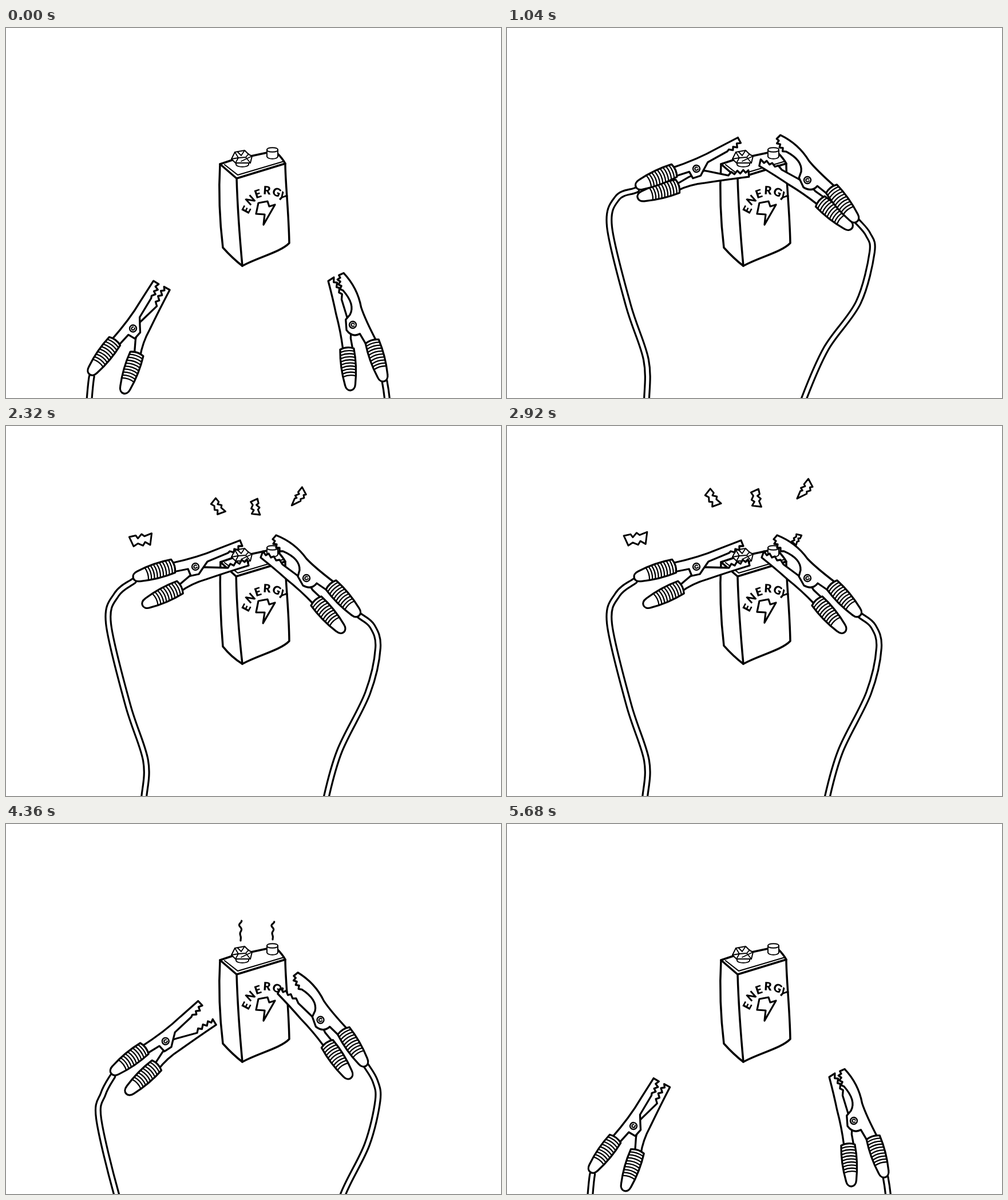
An HTML page with a canvas for the animation above (6.4 s loop, 865 by 647 pixels).

```html
<!DOCTYPE html>
<html lang="en">
<head>
<meta charset="utf-8">
<title>Battery and clamps</title>
<style>
html, body { margin: 0; width: 100%; height: 100%; overflow: hidden; background: #fff; }
canvas { display: block; width: 865px; height: 647px; }
</style>
</head>
<body>
<canvas id="stage" width="865" height="647"></canvas>
<script>
const ctx = document.getElementById('stage').getContext('2d');
const LOOP = 6400, STEP = 40, RAD = Math.PI / 180;

const clamp01 = v => Math.min(1, Math.max(0, v));
const lerp = (a, b, k) => a + (b - a) * k;
const mix = (p, q, k) => [lerp(p[0], q[0], k), lerp(p[1], q[1], k)];
const ease = (t, start, length) => (1 - Math.cos(Math.PI * clamp01((t - start) / length))) / 2;

function shape(path, width = 3.3, fill = '#fff') {
  if (typeof path === 'string') path = new Path2D(path);
  if (fill) { ctx.fillStyle = fill; ctx.fill(path); }
  ctx.lineWidth = width;
  ctx.stroke(path);
}
const polygon = points => 'M' + points.map(p => p.join(' ')).join('L') + 'Z';

// Lever outlines are drawn in the gripping pose, around the pivot.
const leftClamp = {
  pivot: [331, 246], rest: [221, 528], rise: [-45, 740], fall: [3760, 1240],
  main: {
    low: -36.6, open: -6.4, grip: [292, 245, 163.5],
    arm: 'M288 240Q335 230 370 215L409 200L413 210L406 210L406 217L399 215L398 221L391 219L388 222L352 237L343 250L337 259L323 262L318 250L288 256Z'
  },
  other: {
    low: -45.6, open: 10, grip: [304, 282, 154],
    arm: 'M300 280L320 263L345 247L351 247L388 248L392 241L398 244L402 237L408 241L412 234L417 238L421 233L424 244Q385 256 350 268Q325 275 304 290Z'
  },
  tail: [[242, 259], [223, 271]],
  held: [[193, 295], [179, 345], [213, 488], [244, 585], [241, 650], [236, 690]],
  wide: [[193, 297], [179, 347], [212, 485], [243, 580], [244, 650], [241, 690]],
  slack: [[144, 667], [143, 701], [171, 824], [200, 900], [200, 960], [200, 1000]]
};
const rightClamp = {
  pivot: [525, 266], rest: [606, 519], rise: [0, 760], fall: [3900, 1240],
  main: {
    low: 25.3, open: 4.3, grip: [568, 278, 47.7],
    arm: 'M577 276Q540 248 525 232Q505 204 472 191L466 198L470 201L467 206L473 207L472 213L478 213L478 219L484 219Q514 232 513 252L510 263L519 279Q534 287 543 275L562 288Z'
  },
  other: {
    low: 36.5, open: -7.8, grip: [542, 306, 48.4],
    arm: 'M552 302L536 287L530 278L510 262L483 242L478 234L472 235L468 228L463 230L459 223L454 226L449 219L445 230Q470 250 490 268Q515 288 536 310Z'
  },
  tail: [[603, 318], [617, 331]],
  held: [[640, 350], [650, 388], [632, 467], [583, 568], [559, 652], [555, 690]],
  wide: [[631, 361], [638, 392], [614, 480], [558, 560], [519, 648], [508, 690]],
  slack: [[667, 667], [662, 700], [649, 760], [640, 817], [616, 883], [600, 930]]
};

function spline(points) {
  const path = new Path2D();
  path.moveTo(...points[1]);
  for (let i = 1; i < points.length - 2; i++) {
    const [a, b, c, d] = points.slice(i - 1, i + 3);
    path.bezierCurveTo(b[0] + (c[0] - a[0]) / 6, b[1] + (c[1] - a[1]) / 6,
      c[0] - (d[0] - b[0]) / 6, c[1] - (d[1] - b[1]) / 6, ...c);
  }
  return path;
}

function drawGrip([x, y, angle]) {
  ctx.save();
  ctx.translate(x, y);
  ctx.rotate(angle * RAD);
  shape('M0 -12C20 -14 42 -13 63 -9C76 -7 76 7 63 9C42 13 20 14 0 12Q-5 0 0 -12Z');
  for (let i = 0; i < 9; i++) {
    const rx = 5 + i * 5.4, half = 12.5 - i * 0.15;
    shape(`M${rx} ${-half}Q${rx - 4} 0 ${rx} ${half}`, 2.3, null);
  }
  ctx.restore();
}

function drawLever(lever, pivot, at, angle) {
  ctx.save();
  ctx.translate(...at);
  ctx.rotate(angle * RAD);
  ctx.translate(-pivot[0], -pivot[1]);
  shape(lever.arm);
  drawGrip(lever.grip);
  ctx.restore();
}

function drawClamp(c, t) {
  const up = ease(t, ...c.rise) * (1 - ease(t, ...c.fall));
  const open = ease(t, 320, 720) * (1 - ease(t, 1460, 230)) +
    ease(t, 3620, 260) * (1 - ease(t, 3900, 900));
  const at = mix(c.rest, c.pivot, up);
  const turn = lever => lever.low * (1 - up) + lever.open * open;

  const a = turn(c.main) * RAD, cos = Math.cos(a), sin = Math.sin(a);
  const tail = c.tail.map(([x, y]) => {
    const dx = x - c.pivot[0], dy = y - c.pivot[1];
    return [at[0] + dx * cos - dy * sin, at[1] + dx * sin + dy * cos];
  });
  const cable = spline([...tail,
    ...c.held.map((p, i) => mix(c.slack[i], mix(p, c.wide[i], open), up))]);
  shape(cable, 12, null);
  ctx.strokeStyle = '#fff';
  shape(cable, 5.6, null);
  ctx.strokeStyle = '#000';

  drawLever(c.other, c.pivot, at, turn(c.other));
  drawLever(c.main, c.pivot, at, turn(c.main));

  ctx.save();
  ctx.translate(...at);
  ctx.rotate(a);
  const ring = new Path2D();
  ring.arc(0, 0, 6, 0, 7);
  shape(ring, 2.4);
  shape('M2 -2C-1 -4 -4 -1 -2 2Q0 4 3 1', 2, null);
  ctx.restore();
}

const LETTERS = [['E', 420, 318, -62], ['N', 427, 301, -42], ['E', 440, 290, -18],
  ['R', 456, 284, 4], ['G', 473, 287, 24], ['Y', 483, 295, 42]];

function drawBattery(t) {
  const w = t > 1485 && t < 3835 ? (1 + Math.cos(2 * Math.PI * (t - 1720) / 470)) / 2 : 0;
  const l = 374 + 2 * w, f = 403 - 2 * w;
  shape(`M${l} 238L398 230L428 224L456 218L474 219Q483 228 488 237
    C488 270 ${494 + w} 320 495 376C480 392 440 401 413 416
    Q${396 - 5 * w} ${403 + 3 * w} 379 ${384 + 4 * w}Q${370 + 6 * w} 310 ${l} 238Z`, 3.5);
  shape(`M${l} 238L${f} 263L488 237M${f} 263Q${405 - 4 * w} 330 413 416`, 3.5, null);
  shape('M382 239L405 257L486 233', 2.2, null);

  // Terminals
  shape('M402 236V239C404 244 422 244 424 239V235Z', 2);
  shape('M394 229L400 217L417 214L424 221L430 224L427 236L401 236Z', 2);
  shape('M400 217L406 227L419 226L424 220M406 227L401 236M419 226L427 236M405 217L411 223L417 214M394 229L406 227M411 233L430 224', 1.8, null);
  shape('M456 213V225C458 230 473 230 475 225V213Z', 2);
  shape('M456 213C456 208 475 208 475 213C475 218 456 218 456 213Z', 2);

  ctx.fillStyle = '#000';
  ctx.font = '900 20px Lato, sans-serif';
  ctx.textAlign = 'center';
  ctx.textBaseline = 'alphabetic';
  for (const [letter, x, y, angle] of LETTERS) {
    ctx.save();
    ctx.translate(x, y);
    ctx.rotate(angle * RAD);
    ctx.fillText(letter, 0, 7);
    ctx.restore();
  }
  shape(polygon([[441, 306], [457, 303], [460, 312], [470, 309],
    [450 - 2 * w, 344 + 2 * w], [452, 326], [437, 325 + 2 * w]]), 3.2);
}

const STRIP = polygon([[4, -16], [6, -7], [2, -4], [8, 1], [5, 5], [9, 15],
  [-7, 13], [-3, 6], [-8, 3], [-5, -4], [-9, -10]]);
const SPEAR = polygon([[7, -19], [15, -4], [10, -3], [11, 3], [4, 5], [4, 9],
  [-14, 18], [-8, 4], [-4, 3], [-7, -2], [1, -5], [-1, -9]]);
const SPARKS = [
  { to: [207, 194], first: 1957, turn: -90, form: STRIP, size: 1 },
  { to: [317, 68], first: 2130, turn: -27, form: STRIP, size: 1 },
  { to: [434, 65], first: 2136, turn: 0, form: STRIP, size: 1 },
  { to: [549, 66], first: 2086, turn: 0, form: SPEAR, size: 0.84 },
  { to: [658, 115], first: 1705, turn: 38, form: STRIP, size: 1 }
];

function drawSparks(t) {
  const period = 560;
  for (const { to, first, turn, form, size } of SPARKS) {
    const round = Math.floor((t - first) / period);
    const u = (t - first) / period - round;
    if (round < 0 || first + round * period > 3400 || u > 0.9) continue;
    const f = 1 - (1 - u) ** 2, scale = (0.3 + 1.1 * f) * size;
    ctx.save();
    ctx.translate(...mix([438, 235], to, f));
    ctx.rotate(turn * RAD);
    ctx.scale(scale, scale);
    shape(form, 3 / scale);
    ctx.restore();
  }
}

function drawSmoke(t) {
  if (t < 4150 || t >= 5680) return;
  const head = 1 - (1 - clamp01((t - 4150) / 1100)) ** 3;
  const tail = ease(t, 4700, 980);
  for (const [x, y, height, drift] of [[410, 204, 74, -13], [466, 202, 66, 8]]) {
    const path = new Path2D();
    for (let s = tail; s <= head; s += 0.01) {
      const sway = 2.4 * Math.sin(s * 30) * Math.min(1, s * 2.5);
      path.lineTo(x + sway + drift * s ** 4, y - height * s);
    }
    shape(path, 3.2, null);
  }
}

function draw(t) {
  ctx.fillStyle = '#fff';
  ctx.fillRect(0, 0, 865, 647);
  ctx.strokeStyle = '#000';
  ctx.lineJoin = ctx.lineCap = 'round';
  drawSparks(t);
  drawBattery(t);
  drawSmoke(t);
  drawClamp(leftClamp, t);
  drawClamp(rightClamp, t);
}

const begin = performance.now();
function tick() {
  const t = (performance.now() - begin) % LOOP;
  draw(Math.floor(t / STEP) * STEP);
  requestAnimationFrame(tick);
}
tick();
</script>
</body>
</html>
```
